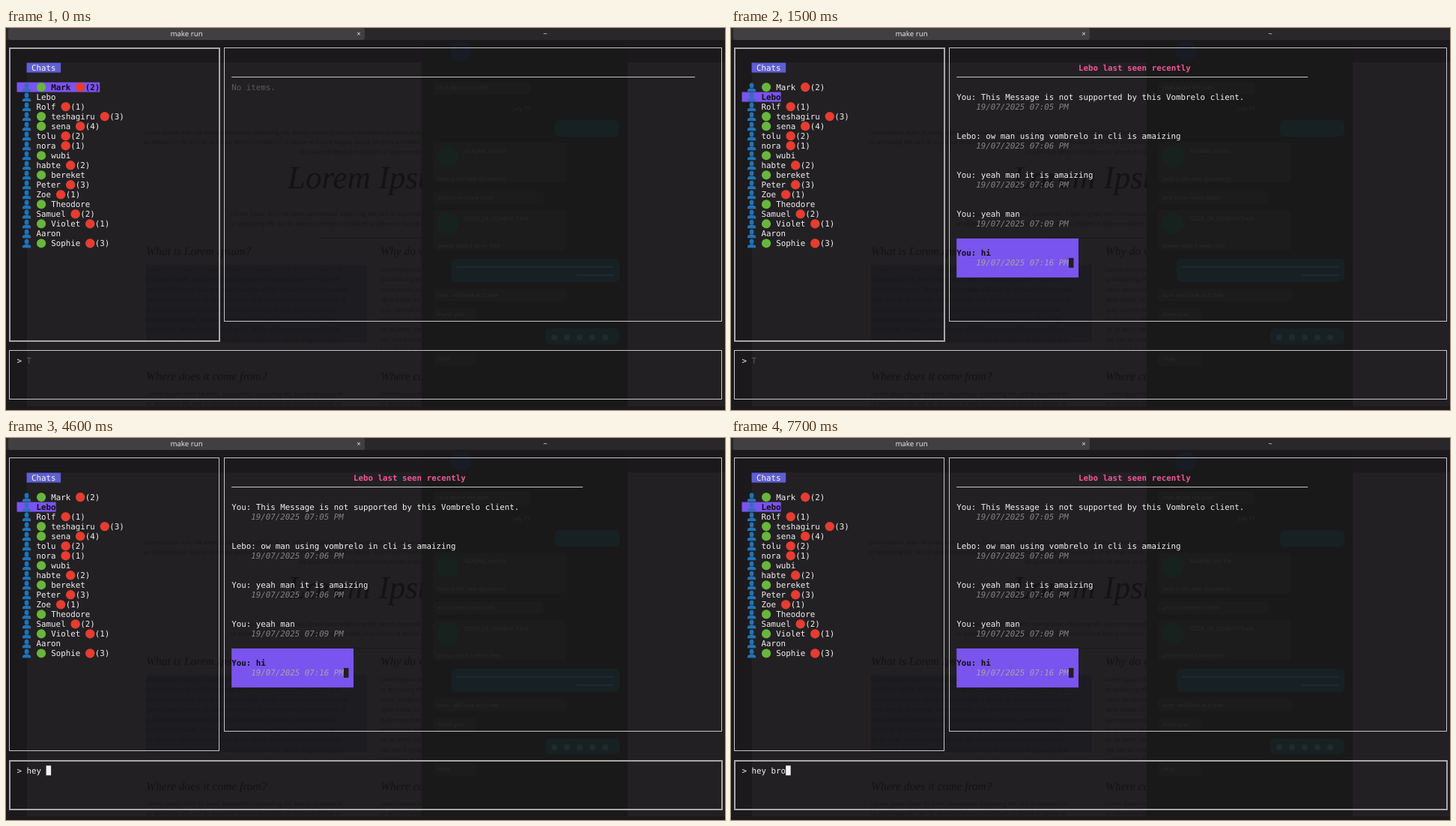
An HTML page that plays this animation: 960x510 px, repeating every 8000 ms.

```html
<!DOCTYPE html>
<html lang="en">
<head>
<meta charset="utf-8">
<title>Terminal chat</title>
<style>
  html, body { margin: 0; width: 100%; height: 100%; overflow: hidden; background: #1b191b; }
  svg { display: block; width: 960px; height: 510px; }
  text { white-space: pre; text-rendering: geometricPrecision; }
  .mono text { font: 10.82px "DejaVu Sans Mono", monospace; fill: #f2f2f2; }
  .mono .bold { font-weight: bold; }
  .mono .dim { fill: #5c5b5c; }
  .mono .date { fill: #858485; font-style: italic; }
  .mono .title { fill: #ee569b; font-weight: bold; }
  .mono .dark { fill: #100e14; font-weight: bold; }
  .tabs text { font: 9.6px "Noto Sans", sans-serif; fill: #e4e4e4; text-anchor: middle; }
  .pane { fill: none; stroke: #c6c6c6; stroke-width: 1; }
  .pane.focus { stroke: #a8a8a8; stroke-width: 2; transform: translate(.5px, .5px); }
  .rule { stroke: #c6c6c6; }
  .page text { font-family: "Liberation Serif", serif; font-style: italic; fill: #141314; }
  .page .small { font: 7.6px "Open Sans", sans-serif; fill: #191819; }
  .win text { font: 7.5px "Open Sans", sans-serif; fill: #2a2b2b; }
</style>
</head>
<body>
<svg id="stage" viewBox="0 0 960 510">
  <defs>
    <clipPath id="left"><rect x="28" y="19" width="527" height="486"/></clipPath>
    <g id="bust" fill="#2173b5">
      <ellipse cx="0" cy="-2.3" rx="2.9" ry="3.5"/>
      <path d="M-5.6 6V4.2Q-5.4 2 -2 1.4H2Q5.4 2 5.6 4.2V6Z"/>
    </g>
  </defs>
</svg>
<script>
const LOOP = 8000, CW = 6.514, RH = 13.03;
const stage = document.getElementById('stage');
const col = c => 1.5 + c * CW;
const row = r => 26.9 + r * RH;

function add(parent, tag, attrs, content) {
  const node = document.createElementNS('http://www.w3.org/2000/svg', tag);
  for (const k in attrs) node.setAttribute(k, attrs[k]);
  if (content !== undefined) node.textContent = content;
  parent.appendChild(node);
  return node;
}
const group = (cls, parent = stage) => add(parent, 'g', { class: cls });
const box = (p, x, y, width, height, fill, rx = 0) => add(p, 'rect', { x, y, width, height, fill, rx });
const dot = (p, cx, cy, r, fill) => add(p, 'circle', { cx, cy, r, fill });
const label = (p, x, y, s, cls = '') => add(p, 'text', { x, y, class: cls }, s);
const type = (p, c, r, s, cls) => label(p, col(c), row(r) + 3.9, s, cls);
const cells = (p, c, r, w, h, fill) => box(p, col(c), row(r) - RH / 2, w * CW, h * RH, fill);
const show = (node, on) => node.setAttribute('visibility', on ? 'visible' : 'hidden');

// Web page showing faintly through the terminal
function drawPage() {
  const p = group('page');
  box(p, 28, 46, 932, 459, '#222022');
  box(p, 0, 46, 28, 459, '#1b191c');
  const g = add(p, 'g', { 'clip-path': 'url(#left)' });
  const lorem = 'Lorem ipsum dolor sit amet, consectetur adipiscing elit, sed do eiusmod tempor incididunt ut labore et dolore magna aliqua. Ut enim ad minim veniam, quis nostrud exercitation ullamco laboris nisi ut aliquip. ';
  const long = lorem + lorem + lorem;
  const lines = (x, y, n, len, step = 13.4) => {
    for (let i = 0; i < n; i++) label(g, x, y + i * step, long.substr(i * 37, len).trim(), 'small');
  };
  box(g, 187, 316, 295, 104, '#1d1c20');
  lines(184, 142, 2, 110);
  label(g, 390, 168, long.substr(60, 50), 'small');
  lines(300, 251, 2, 80);
  lines(187, 325, 8, 74);
  lines(500, 325, 9, 30);
  lines(187, 491, 2, 74);
  lines(500, 491, 2, 30);
  const big = label(g, 376, 214, 'Lorem Ipsum');
  big.style.fontSize = '43px';
  for (const [x, y, s] of [
    [187, 303, 'What is Lorem Ipsum?'], [500, 303, 'Why do we use it?'],
    [187, 470, 'Where does it come from?'], [500, 470, 'Where can I get some?']
  ]) label(g, x, y, s).style.fontSize = '15.5px';
  box(g, 415, 280, 140, 1, '#1b1a1b');
}

// Messenger window, also faint
function drawWindow() {
  const w = group('win');
  box(w, 555, 19, 275, 486, '#191919');
  dot(w, 607, 31, 14, '#191c25');
  for (const [x, y, width, h] of [[570, 72, 130, 17], [570, 153, 178, 54], [570, 218, 148, 17], [570, 243, 178, 54], [570, 348, 180, 17], [570, 374, 58, 17], [570, 434, 58, 17]])
    box(w, x, y, width, h, '#1c1c1c', 5);
  for (const [x, y, width, h] of [[733, 123, 86, 22], [595, 308, 224, 31], [720, 401, 99, 21]])
    box(w, x, y, width, h, '#172123', 6);
  dot(w, 590, 172, 15, '#17221f');
  dot(w, 590, 261, 15, '#17221f');
  for (const [x, y, s] of [
    [576, 82, 'chat about the plan'], [677, 110, 'July 15'], [612, 167, 'README.md file'],
    [576, 204, 'here is the new document'], [576, 229, 'and some more notes'],
    [612, 257, 'CODE_OF_CONDUCT.md'], [576, 293, 'please read it when free'],
    [576, 359, 'sure I will look at it now'], [576, 385, 'thank you'], [576, 444, 'okay']
  ]) label(w, x, y, s);
  box(w, 602, 318, 210, 2, '#1d2b2e');
  box(w, 762, 329, 50, 2, '#1d2b2e');
  for (let i = 0; i < 5; i++) dot(w, 732 + i * 17, 413, 4, '#202b2b');
}

function drawTabs() {
  const t = group('tabs');
  box(t, 0, 0, 960, 19, '#1b191b');
  box(t, 0, 0, 960, 16, '#29272a');
  box(t, 3, 0, 476, 16, '#423f43', 3);
  label(t, 241, 11, 'make run');
  label(t, 471, 11, '×');
  label(t, 720, 11, '~');
}

const chats = [
  ['Mark', 1, 2], ['Lebo', 0, 0], ['Rolf', 0, 1], ['teshagiru', 1, 3], ['sena', 1, 4],
  ['tolu', 0, 2], ['nora', 0, 1], ['wubi', 1, 0], ['habte', 0, 2], ['bereket', 1, 0],
  ['Peter', 0, 3], ['Zoe', 0, 1], ['Theodore', 1, 0], ['Samuel', 0, 2], ['Violet', 1, 1],
  ['Aaron', 0, 0], ['Sophie', 1, 3]
];

function drawChat(p, [name, online, unread], i) {
  const r = i + 4, start = online ? 9 : 6, end = start + name.length;
  const bar = cells(p, 2, r, (unread ? end + 6 : end + 1) - 2 - (unread ? 0 : 1), 1, '#7a54ee');
  const bust = add(p, 'use', { href: '#bust', x: col(4), y: row(r) });
  if (online) dot(p, col(7), row(r), 6.1, '#68b63d');
  const texts = [type(p, start, r, name)];
  if (unread) {
    dot(p, col(end + 2), row(r), 6.2, '#e63c31');
    texts.push(type(p, end + 3, r, `(${unread})`));
  }
  return on => {
    show(bar, on);
    bust.setAttribute('opacity', on ? .8 : 1);
    texts.forEach(t => t.setAttribute('class', on ? 'dark' : ''));
  };
}

function drawMessages(p) {
  const day = '19/07/2025 07:';
  [
    ['You: This Message is not supported by this Vombrelo client.', '05'],
    ['Lebo: ow man using vombrelo in cli is amaizing', '06'],
    ['You: yeah man it is amaizing', '06'],
    ['You: yeah man', '09'],
    ['You: hi', '16']
  ].forEach(([s, minute], i) => {
    const r = 5 + i * 4, last = i === 4;
    if (last) cells(p, 46, r - 1, 25, 4, '#7a54ee');
    type(p, 46, r, s, last ? 'dark' : '');
    const date = type(p, 50, r + 1, `${day}${minute} PM`, 'date');
    if (last) {
      date.style.fill = '#aaa3a8';
      cells(p, 69, r + 1, 1, 1, '#211f22');
    }
  });
}

drawPage();
drawWindow();
drawTabs();

const ui = group('mono');
const pane = (x, y, right, bottom) =>
  add(ui, 'rect', { x, y, width: right - x, height: bottom - y, class: 'pane' });
const panes = [
  pane(4.5, 26.5, 284.5, 417.5),
  pane(291.5, 26.5, 955.5, 391.5),
  pane(4.5, 430.5, 955.5, 495.5)
];

cells(ui, 4, 2, 7, 1, '#5f5fd3');
type(ui, 5, 2, 'Chats').style.fill = '#f8f8dc';
const marks = chats.map((c, i) => drawChat(ui, c, i));

const rule = add(ui, 'line', { class: 'rule', x1: col(46), y1: 65.5, y2: 65.5 });
const title = type(ui, 71, 2, 'Lebo last seen recently', 'title');
const empty = type(ui, 46, 4, 'No items.', 'dim');
const messages = group('', ui);
drawMessages(messages);

type(ui, 2, 32, '>');
const typed = type(ui, 4, 32, '');
const cursor = cells(ui, 4, 32, 1, 1, '#f2f2f2');
const hint = type(ui, 4, 32, 'T', 'dim');

// Each list holds [start ms, value]
const selection = [[0, 0], [500, 1], [600, 2], [900, 1]];
const focus = [[0, 0], [2800, 1], [3100, 2]];
const draft = 'hey bro ';
const typing = [
  [0, 0], [3900, 1], [4000, 2], [4100, 3], [4600, 4], [4800, 5], [5000, 6], [5100, 7], [5300, 8],
  [5600, 7], [5700, 6], [5900, 5], [6000, 4], [6200, 3], [6400, 4], [7000, 5], [7600, 6], [7700, 7]
];
const at = (steps, t) => steps.reduce((v, s) => t >= s[0] ? s[1] : v, steps[0][1]);

function render(t) {
  const selected = at(selection, t), active = at(focus, t), n = at(typing, t);
  const opened = t >= 1200, loaded = t >= 1500;
  marks.forEach((mark, i) => mark(i === selected));
  panes.forEach((p, i) => p.setAttribute('class', i === active ? 'pane focus' : 'pane'));
  rule.setAttribute('x2', col(opened ? 118 : 141));
  show(title, opened);
  show(empty, !loaded);
  show(messages, loaded);
  typed.textContent = draft.slice(0, n);
  cursor.setAttribute('x', col(4 + n));
  show(cursor, active === 2);
  show(hint, n === 0);
}

const begin = performance.now();
function tick() {
  render((performance.now() - begin) % LOOP);
  requestAnimationFrame(tick);
}
tick();
</script>
</body>
</html>
```
